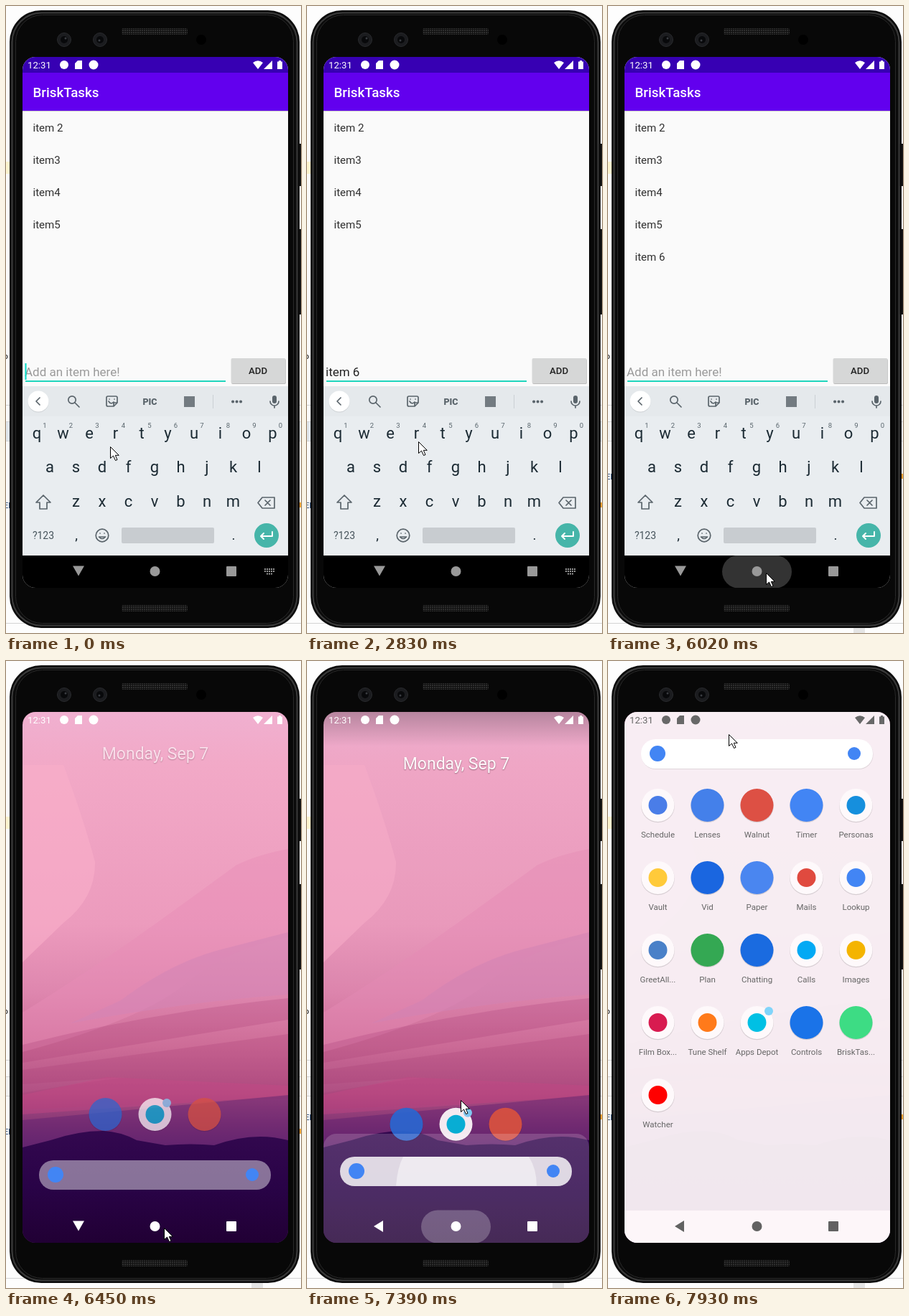
Write an HTML page that moves like this. It is 411 by 874 pixels and loops after 8000 ms.

```html
<!DOCTYPE html>
<html lang="en">
<head>
<meta charset="utf-8">
<title>To-do app demo</title>
<style>
html, body { margin: 0; width: 100%; height: 100%; overflow: hidden; background: #fdfdfd; }
svg { display: block; width: 411px; height: 874px; font-family: Roboto, sans-serif; }
.mid { text-anchor: middle; }
.line { fill: none; stroke: #5a646b; stroke-width: 1.7; stroke-linejoin: round; stroke-linecap: round; }
</style>
</head>
<body>
<svg viewBox="0 0 411 874">
  <defs>
    <clipPath id="screenClip"><rect x="23" y="71" width="370" height="740" rx="18"/></clipPath>
    <linearGradient id="sky" x2="0" y2="1">
      <stop offset="0" stop-color="#f0b0d0"/><stop offset=".1" stop-color="#f2a9c7"/>
      <stop offset=".4" stop-color="#ec9bbd"/><stop offset=".53" stop-color="#de86ae"/>
      <stop offset=".63" stop-color="#cd6c97"/><stop offset=".72" stop-color="#b04f83"/>
      <stop offset=".78" stop-color="#813474"/><stop offset=".84" stop-color="#5a226b"/>
    </linearGradient>
    <linearGradient id="ground" x2="0" y2="1">
      <stop offset="0" stop-color="#33084f"/><stop offset=".5" stop-color="#290347"/><stop offset="1" stop-color="#210034"/>
    </linearGradient>
    <linearGradient id="scrimFade" x2="0" y2="1">
      <stop offset="0" stop-opacity=".24"/><stop offset="1" stop-opacity="0"/>
    </linearGradient>
    <pattern id="mesh" width="3" height="3" patternUnits="userSpaceOnUse">
      <rect width="3" height="3" fill="#111"/><circle cx="1" cy="1" r="1" fill="#383838"/>
    </pattern>
  </defs>

  <!-- Desktop behind the device -->
  <rect width="411" height="874" fill="#fdfdfd"/>
  <rect y="217" width="6" height="17" fill="#fff6cf"/>
  <text x="-7" y="492" font-size="11">to</text>
  <path d="M0 556.5H411M0 579.5H411M0 606.5H411M0 860.5H411" stroke="#d4d4d4"/>
  <rect id="band" y="580" width="411" height="26" fill="#e3e8ed"/>
  <g id="margin"><text x="-3" y="4" font-size="11" fill="#163a6b">EM</text><path d="M409-4h2v7h-2z" fill="#f0a030"/></g>
  <rect id="thumb" x="342" y="867" width="16" height="7" fill="#e4e4e4"/>

  <!-- Device body -->
  <path d="M408 192h3v59h-3zM408 311h3v119h-3z" fill="#111"/>
  <rect x="5" y="6" width="404" height="861" rx="44" fill="#0b0b0b"/>
  <rect x="8.5" y="9.5" width="397" height="854" rx="41" fill="none" stroke="#3b3b3b" stroke-width="2"/>
  <rect x="13.5" y="12.5" width="387" height="848" rx="37" fill="#080808" stroke="#292929"/>
  <g fill="#1b1c1f" stroke="#292a2d"><circle cx="81" cy="47" r="9.5"/><circle cx="131" cy="47" r="9.5"/></g>
  <g fill="#08090b"><circle cx="81" cy="47" r="5"/><circle cx="131" cy="47" r="5"/></g>
  <g fill="#3a3d42"><circle cx="83" cy="45" r="1.5"/><circle cx="130" cy="48" r="1.5"/></g>
  <circle cx="272" cy="47" r="7" fill="#000"/>
  <rect x="161" y="31" width="92" height="9" rx="2" fill="url(#mesh)"/>
  <rect x="161" y="835" width="92" height="9" rx="2" fill="url(#mesh)"/>

  <g clip-path="url(#screenClip)">
    <g id="app">
      <rect x="23" y="71" width="370" height="740" fill="#fafafa"/>
      <rect x="23" y="71" width="370" height="23" fill="#3700b3"/>
      <rect x="23" y="93" width="370" height="53" fill="#6200ee"/>
      <path d="M23 146.5H393" stroke="#c9c9c9"/>
      <text x="37.5" y="127" font-size="18.8" font-weight="500" fill="#fff">BriskTasks</text>
      <g id="list" fill="#303030"></g>
      <text id="entry" x="26" y="516" font-size="17" xml:space="preserve"></text>
      <path d="M27 523H306" stroke="#1fd5bd" stroke-width="2"/>
      <rect id="caret" y="498" width="2" height="23" fill="#03dac5"/>
      <rect x="314" y="492" width="76" height="35" rx="2" fill="#bbb"/>
      <rect x="313.5" y="491" width="76" height="35" rx="2" fill="#d6d7d7"/>
      <text class="mid" x="351" y="513" font-size="13.2" font-weight="500" fill="#222">ADD</text>

      <rect x="23" y="530" width="370" height="236" fill="#e9edf0"/>
      <rect x="23" y="530" width="370" height="42" fill="#e5e9ec"/>
      <circle cx="45" cy="552" r="14.5" fill="#ccd0d3"/>
      <circle cx="45" cy="551" r="14.5" fill="#fff"/>
      <path id="chevron" class="line" d="M47 546l-5 5l5 5"/>
      <g id="tools">
        <circle class="line" cx="92" cy="549" r="5.2"/><path class="line" d="M96 553l6 6"/>
        <path class="line" d="M142 544h11a2 2 0 0 1 2 2v7l-5 5h-8a2 2 0 0 1-2-2v-10a2 2 0 0 1 2-2M155 553h-5v5M143 551q3 5 7 1M144 548h.1M151 548h.1"/>
        <text class="mid" x="200.5" y="555.5" font-size="12.5" font-weight="900" fill="#5a646b">PIC</text>
        <rect x="248" y="544" width="15" height="15" fill="#737b81"/>
        <path d="M288.5 542V561" stroke="#cbd0d4"/>
        <path class="line" d="M316 551.5h.1M321.5 551.5h.1M327 551.5h.1" style="stroke-width:4"/>
      </g>
      <rect x="371" y="543" width="6" height="11" rx="3" fill="#5a646b"/>
      <path class="line" d="M368 551a6 6 0 0 0 12 0M374 557v3"/>
      <g id="keys" class="mid" fill="#1b2a33"></g>
      <path class="line" d="M52 682l10 10h-5v9h-10v-9h-5z"/>
      <path class="line" d="M357 685h17v15h-17l-6-7.5zM361 689l7 7M368 689l-7 7"/>
      <circle class="line" cx="134" cy="738" r="8.8"/>
      <path class="line" d="M129.5 740q4.5 5 9 0zM131 735h.1M137 735h.1"/>
      <rect x="161" y="727" width="129" height="22" rx="2" fill="#c8ccd0"/>
      <circle cx="363" cy="738" r="17" fill="#46b5a9"/>
      <path class="line" d="M371 733v6h-16m4-4l-4 4l4 4" style="stroke:#fff;stroke-width:2"/>
      <g id="toast">
        <rect x="137" y="697" width="141" height="46" rx="23" fill="#ebeef0"/>
        <text class="mid" x="207.5" y="725" font-size="13.2" fill="#222">Item was added</text>
      </g>
      <rect x="23" y="766" width="370" height="45" fill="#000"/>
      <path id="keyboardIcon" d="M360 785h15M360 788h15M363 791.5h9" stroke="#999" stroke-width="2" stroke-dasharray="2 1"/>
    </g>

    <g id="home">
      <rect x="23" y="71" width="370" height="740" fill="url(#sky)"/>
      <path d="M23 145H80Q108 220 124 280Q125 330 80 365L23 420Z" fill="#fab0ca" opacity=".6"/>
      <path d="M23 490Q120 430 210 365T320 285Q350 270 393 262V385Q310 400 250 450T23 545Z" fill="#e78db5" opacity=".45"/>
      <path d="M160 473Q230 420 300 402L393 378V465Q250 475 90 505Z" fill="#d486b7" opacity=".55"/>
      <g fill="#a93c75" opacity=".25">
        <path d="M23 535Q200 490 393 470V500L23 560Z"/><path d="M23 570L393 520V565L23 590Z"/>
        <path d="M23 602Q210 570 393 555V610L23 625Z"/>
      </g>
      <path d="M23 605L140 580L393 592V606L23 632Z" fill="#c94684" opacity=".4"/>
      <path d="M23 640L393 605V680H23Z" fill="#5d2070" opacity=".45"/>
      <path d="M23 678L62 668Q100 655 135 655Q160 656 182 668L222 675Q260 672 290 675Q345 655 393 668V811H23Z" fill="url(#ground)"/>
      <rect id="shade" x="23" y="71" width="370" height="740" fill="#5b284f"/>
      <rect id="scrim" x="23" y="71" width="370" height="48" fill="url(#scrimFade)"/>
      <g id="workspace">
        <text id="date" class="mid" x="208" y="153" font-size="23" fill="#fff" style="text-shadow:0 1px 2px #0006">Monday, Sep 7</text>
        <g id="dock"></g>
      </g>
      <g id="sheet">
        <rect id="sheetFill" x="23" width="370" height="830" rx="18" fill="#fef8fb"/>
        <rect id="barShadow" x="46.5" y="33" width="323" height="41" rx="20"/>
        <rect id="bar" x="46" y="32" width="323" height="41" rx="20" fill="#fff"/>
        <path id="barGlow" d="M124 72.5Q126 47 134 32H309Q320 49 320 72.5Z" fill="#fff"/>
        <circle cx="69" cy="52" r="11" fill="#4285f4"/>
        <circle cx="343" cy="52" r="9" fill="#4285f4"/>
        <g id="apps"></g>
      </g>
      <rect id="navFill" x="23" y="766" width="370" height="45" fill="#fdf6f9"/>
    </g>

    <rect id="press" x="159" y="765.5" width="97" height="46" rx="23" fill="#fff"/>
    <g id="nav">
      <path id="back" d="M93 780.5h16l-8 14z"/>
      <circle cx="207.5" cy="788" r="7"/><rect x="307" y="781" width="14" height="14" rx="1"/>
    </g>
    <g id="status">
      <text x="30" y="87" font-size="13.2">12:31</text>
      <circle cx="81" cy="82" r="6"/><circle cx="122" cy="82" r="6.5"/>
      <path d="M100 76h6v12h-10v-8zM344 79q7-5.5 14 0l-7 9zM371 76v12h-12zM380 76h3v1.5h2v10.5h-7v-10.5h2z"/>
    </g>
  </g>
  <path id="pointer" d="M0 0V16L4 12.5L7 19L9.5 18L6.8 11.8H11.8Z" fill="#fff" stroke="#000"/>
</svg>
<script>
const LOOP = 8000;
const $ = id => document.getElementById(id);
const set = (id, attrs) => { for (const name in attrs) $(id).setAttribute(name, attrs[name]); };
const show = (id, on) => set(id, { opacity: on ? 1 : 0 });
const clamp = v => Math.max(0, Math.min(1, v));
const label = (x, y, size, text, extra = '') => `<text x="${x}" y="${y}" font-size="${size}" ${extra}>${text}</text>`;

// Moments at which the screen refreshes
const TICKS = [0, 140, 680, 1220, 1340, 1460, 1580, 2010, 2410, 2680, 2830, 2950, 3070, 3220, 3370,
  3520, 3640, 3770, 3900, 4060, 4210, 4670, 4790, 4910, 5060, 5180, 5330, 5470, 5610,
  5760, 5880, 6020, 6450, 6570, 6720, 6990, 7120, 7260, 7390, 7540, 7690, 7810, 7930];

const POINTER = [[0, 145, 614], [140, 150, 612], [2410, 150, 612], [2830, 155, 607], [3370, 345, 508],
  [4210, 346, 510], [4670, 328, 545], [5610, 225, 770], [6020, 220, 790], [6990, 220, 790],
  [7260, 217, 700], [7390, 214, 612], [7540, 202, 410], [7930, 168, 102]];
const SHEET_TOP = [[6450, 664], [6570, 675], [6720, 680], [7260, 680], [7390, 659], [7540, 447], [7690, 215], [7810, 105], [7930, 77]];
const SHEET_ALPHA = [[0, 0], [.035, .17], [.386, .86], [1, .93]];
const TYPED = [[1220, 'i'], [1340, 'it'], [1460, 'item'], [1580, 'item '], [2410, 'item 6'], [3520, '']];

const APPS = [
  ['Schedule', '#4a7de8', 1], ['Lenses', '#4480ea'], ['Walnut', '#dd5044'], ['Timer', '#4285f4'], ['Personas', '#168fdd', 1],
  ['Vault', '#ffca3a', 1], ['Vid', '#1a66e0'], ['Paper', '#4a86f0'], ['Mails', '#e04a3f', 1], ['Lookup', '#4285f4', 1],
  ['GreetAll...', '#4a80c8', 1], ['Plan', '#34a853'], ['Chatting', '#1a6be0'], ['Calls', '#03a9f4', 1], ['Images', '#f4b400', 1],
  ['Film Box...', '#d81b50', 1], ['Tune Shelf', '#ff7a1a', 1], ['Apps Depot', '#00c0e4', 1], ['Controls', '#1a73e8'], ['BriskTas...', '#3ddc84'],
  ['Watcher', '#f00', 1]];

function icon(x, y, color, plated, badge) {
  const disc = (cy, r, fill) => `<circle cx="${x}" cy="${cy}" r="${r}" fill="${fill}"/>`;
  return disc(y + 1, 23.3, '#0002') + disc(y, 23, plated ? '#fef9fb' : color) + (plated ? disc(y, 13, color) : '') +
    (badge ? `<circle cx="${x + 16.5}" cy="${y - 16}" r="6" fill="#81d4fa"/>` : '');
}

$('list').innerHTML = ['item 2', 'item3', 'item4', 'item5', 'item 6']
  .map((text, i) => label(37.5, 174.5 + i * 45.2, 15.1, text)).join('');
const newItem = $('list').lastChild;

$('keys').innerHTML = [['qwertyuiop', 43, 603], ['asdfghjkl', 61, 650], ['zxcvbnm', 97.5, 698]]
  .map(([row, x, y]) => [...row].map((key, i) => label(x + i * 36.5, y, 22, key)).join('')).join('') +
  [...'1234567890'].map((digit, i) => label(54 + i * 36.5, 588, 9.5, digit, 'fill="#59656c"')).join('') +
  label(52, 743, 14, '?123', 'fill="#46535b"') + label(98, 744, 19, ',') + label(317, 744, 19, '.');

$('dock').innerHTML = icon(138.5, 648, '#2a66d0') + icon(207.5, 648, '#00b8dc', 1, 1) + icon(276.5, 648, '#d9513f');
$('apps').innerHTML = APPS.map(([name, color, plated], i) => {
  const x = 69.5 + i % 5 * 69, y = 124 + Math.floor(i / 5) * 101;
  return icon(x, y, color, plated, name === 'Apps Depot') + label(x, y + 45, 11.5, name, 'class="mid" fill="#666"');
}).join('');

function tween(keys, t) {
  const next = keys.findIndex(key => key[0] > t);
  if (next <= 0) return keys[next ? keys.length - 1 : 0].slice(1);
  const [a, b] = [keys[next - 1], keys[next]];
  const f = (t - a[0]) / (b[0] - a[0]);
  return a.slice(1).map((v, i) => v + (b[i + 1] - v) * f);
}

function drawApp(t) {
  const text = (TYPED.findLast(step => t >= step[0]) || [0, ''])[1];
  const entry = $('entry');
  entry.textContent = text || 'Add an item here!';
  set('entry', { fill: text ? '#222' : '#9a9a9a' });
  const end = text ? 26 + entry.getSubStringLength(0, text.length) : 26.5;
  const blinkOn = [[0, 140], [680, 2010], [2410, 2680], [3520, 4060], [4670, 5180], [5610, 6020]]
    .some(([from, to]) => t >= from && t < to);
  set('caret', { x: end, opacity: blinkOn ? 1 : 0 });
  const typing = t >= 1220 && t < 2410;
  show('tools', !typing);
  set('chevron', { d: typing ? 'M43 546l5 5l-5 5' : 'M47 546l-5 5l5 5' });
  newItem.setAttribute('opacity', t >= 3520 ? 1 : 0);
  set('toast', { opacity: clamp((t - 3520) / 500) * clamp((5880 - t) / 400) });
  show('keyboardIcon', t < 6020);
}

function drawHome(t) {
  const top = tween(SHEET_TOP, t)[0];
  const lift = clamp((680 - top) / 603) * (t >= 6990);
  const settle = clamp((t - 6300) / 420);
  const shift = t < 6720 ? top - 680 : -65 * lift;
  const fade = clamp(1 - 2.1 * lift);
  set('workspace', { transform: `translate(0 ${shift})` });
  set('date', { opacity: (.4 + .6 * settle) * fade });
  set('dock', { opacity: (.55 + .45 * settle) * fade });
  set('shade', { opacity: clamp(lift * .5) });
  set('scrim', { opacity: settle < 1 ? 0 : 1 - lift });
  set('sheet', { transform: `translate(0 ${top})` });
  set('sheetFill', { y: -30 * clamp(lift * 4 - 3), opacity: tween(SHEET_ALPHA, lift)[0] });
  set('bar', { opacity: Math.min(1, .25 + .53 * settle + lift) });
  set('barShadow', { opacity: .1 * clamp(lift * 3) });
  set('barGlow', { opacity: t >= 7260 && t < 7540 ? .45 : 0 });
  set('apps', { opacity: clamp((lift - .05) * 1.5) });
  set('navFill', { opacity: clamp(lift * 2 - 1) });
  return lift;
}

function draw(elapsed) {
  const t = TICKS.findLast(tick => tick <= elapsed);
  const atHome = t >= 6450;
  show('app', !atHome);
  show('home', atHome);
  let lift = 0;
  if (atHome) lift = drawHome(t); else drawApp(t);

  const lightSheet = lift > .7;
  set('nav', { fill: !atHome ? '#999' : lightSheet ? '#626262' : '#fff' });
  set('status', { fill: lightSheet ? '#686868' : '#fff' });
  set('back', { d: t < 6720 ? 'M93 780.5h16l-8 14z' : 'M106 780v16l-13-8z' });
  set('press', { opacity: t >= 5880 && t < 6450 ? .2 : t >= 6990 && t < 7540 ? .24 : 0 });

  set('margin', { transform: `translate(0 ${t < 3520 ? 696 : t < 6990 ? 656 : 636})` });
  set('band', { fill: t < 3520 ? '#e0e6eb' : '#f5f5f5' });
  show('thumb', t >= 5610);
  const [x, y] = tween(POINTER, t);
  set('pointer', { transform: `translate(${Math.round(x) + .5} ${Math.round(y) + .5})` });
}

const start = performance.now();
function frame() {
  draw((performance.now() - start) % LOOP);
  requestAnimationFrame(frame);
}
frame();
</script>
</body>
</html>
```
